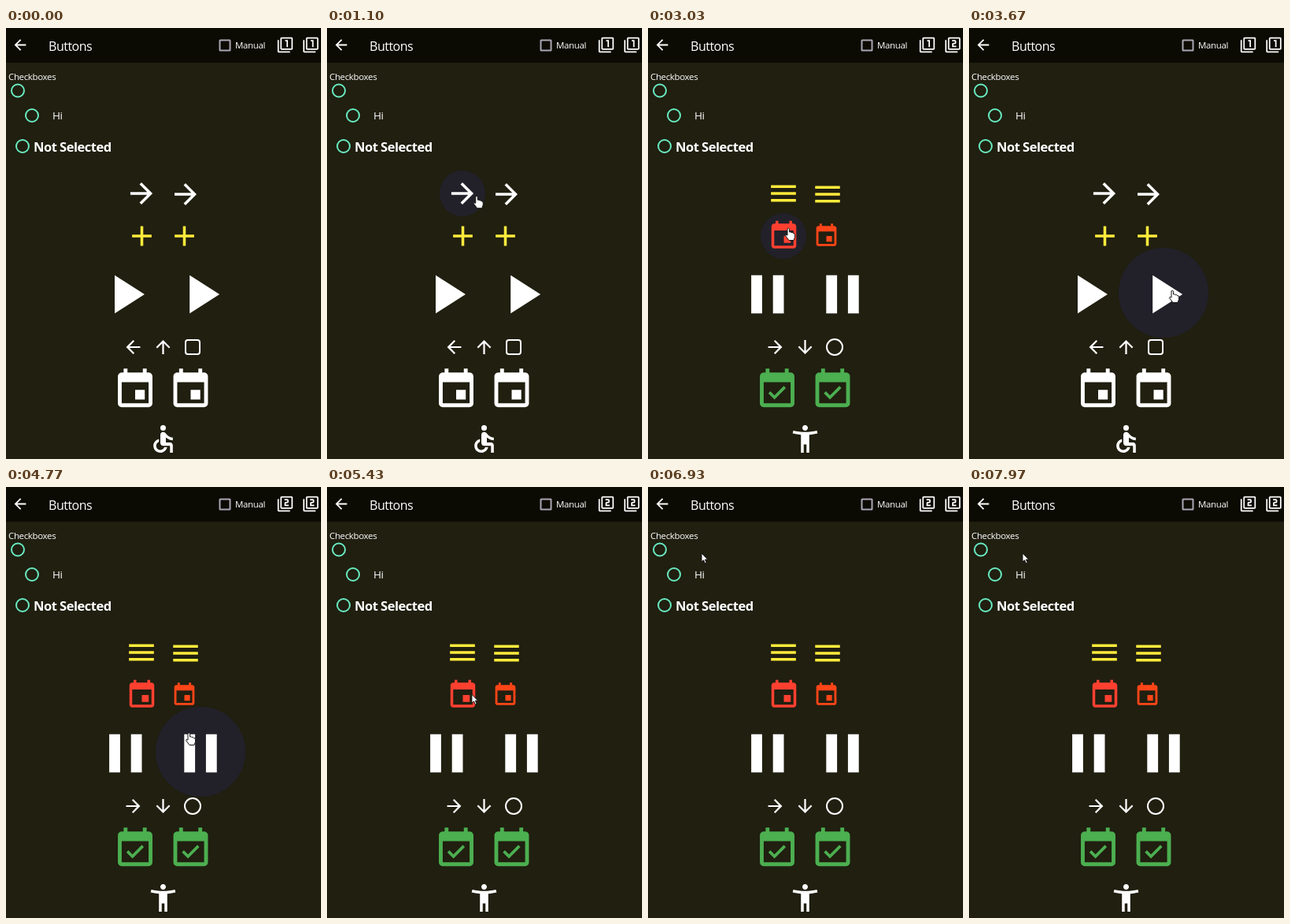
An HTML page with a canvas that plays this animation: 400x547 px, repeating every 8 s.

```html
<!DOCTYPE html>
<html lang="en">
<head>
<meta charset="utf-8">
<title>Buttons</title>
<style>
  html, body { margin: 0; width: 100%; height: 100%; overflow: hidden; background: #201f10; }
  canvas { display: block; width: 400px; height: 547px; }
</style>
</head>
<body>
<canvas id="stage" width="400" height="547"></canvas>
<script>
const ctx = document.getElementById('stage').getContext('2d');
const LOOP = 8000;
const WHITE = '#fff', YELLOW = '#ffeb3b', GREEN = '#4caf50', MINT = '#68e9c0';
const BODY = '#201f10', HEADER = '#0c0b03', HOVER = '#22212a';

// Icons on a 24 unit grid
const calendar = 'M19 3h-1V1h-2v2H8V1H6v2H5c-1.11 0-1.99.9-1.99 2L3 19c0 1.1.89 2 2 2h14c1.1 0 2-.9 2-2V5c0-1.1-.9-2-2-2zm0 16H5V8h14v11z';
const pages = 'M3 5H1v16c0 1.1.9 2 2 2h16v-2H3V5zM21 1H7c-1.1 0-2 .9-2 2v14c0 1.1.9 2 2 2h14c1.1 0 2-.9 2-2V3c0-1.1-.9-2-2-2zm0 16H7V3h14v14z';
const shapes = {
  arrow: 'M12 4l-1.41 1.41L16.17 11H4v2h12.17l-5.58 5.59L12 20l8-8z',
  menu: 'M3 18h18v-2H3v2zm0-5h18v-2H3v2zm0-7v2h18V6H3z',
  plus: 'M19 13h-6v6h-2v-6H5v-2h6V5h2v6h6v2z',
  play: 'M8 5v14l11-7z',
  pause: 'M6 19h4V5H6v14zm8-14v14h4V5h-4z',
  event: calendar + 'M17 12h-5v5h5v-5z',
  eventDone: calendar + 'M16.53 11.06L15.47 10l-4.88 4.88-2.12-2.12-1.06 1.06L10.59 17l5.94-5.94z',
  one: pages + 'M14 15h2V5h-4v2h2v8z',
  two: pages + 'M17 13h-4v-2h2c1.1 0 2-.89 2-2V7c0-1.11-.9-2-2-2h-4v2h4v2h-2c-1.1 0-2 .89-2 2v4h6v-2z',
  wheelchair: 'M14 4a2 2 0 1 1-4 0a2 2 0 1 1 4 0zM19 13v-2c-1.54.02-3.09-.75-4.07-1.83l-1.29-1.43c-.17-.19-.38-.34-.61-.45H13c-.35-.2-.75-.3-1.19-.26C10.76 7.11 10 8.04 10 9.09V15c0 1.1.9 2 2 2h5v5h2v-5.5c0-1.1-.9-2-2-2h-3v-3.45c1.29 1.07 3.25 1.94 5 1.95zm-6.17 5c-.41 1.16-1.52 2-2.83 2-1.66 0-3-1.34-3-3 0-1.31.84-2.41 2-2.83V12.1c-2.28.46-4 2.48-4 4.9 0 2.76 2.24 5 5 5 2.42 0 4.44-1.72 4.9-4h-2.07z',
  person: 'M20.5 6c-2.61.7-5.67 1-8.5 1s-5.89-.3-8.5-1L3 8c1.86.5 4 .83 6 1v13h2v-6h2v6h2V9c2-.17 4.14-.5 6-1l-.5-2zM12 6c1.1 0 2-.9 2-2s-.9-2-2-2-2 .9-2 2 .9 2 2 2z'
};
const paths = Object.fromEntries(Object.entries(shapes).map(([name, d]) => [name, new Path2D(d)]));
const hand = new Path2D('M0 1Q1.4-.8 2.6 1V5Q4.5 4.3 5 5.7Q7 5 7.4 6.6Q9.5 6.2 9.5 8.5V11.5L8 15.5H2L-2.6 9.5Q-2.8 7.8 0 9z');
const pointer = new Path2D('M0 0V11L2.6 8.8L4.4 13L6.3 12.2L4.5 8.1H7.8z');

const cursorKeys = [
  [0, 412, 300], [100, 412, 300], [950, 190, 214], [1500, 183, 210], [2350, 183, 210],
  [2800, 177, 254], [3250, 177, 254], [3580, 257, 333], [4250, 257, 333], [4650, 231, 312],
  [5200, 231, 312], [5850, 68, 143], [6770, 68, 143], [6900, 68, 84], [LOOP, 68, 84]
];
// start, end, centre x, centre y, radius
const roundHovers = [
  [950, 2500, 172, 210, 29], [2550, 3330, 172, 264, 29],
  [3400, 3500, 151, 336, 57], [3480, 5150, 247, 336, 57]
];
const rowHover = [5720, 6810];

const clamp = v => Math.max(0, Math.min(1, v));
const fade = (t, start, end) => Math.min(clamp((t - start) / 120), clamp((end + 120 - t) / 120));
const within = (t, [start, end]) => t >= start && t < end;

function icon(name, x, y, scale, color = WHITE, turn = 0) {
  ctx.save();
  ctx.translate(x, y);
  ctx.rotate(turn * Math.PI / 2);
  ctx.scale(scale, scale);
  ctx.translate(-12, -12);
  ctx.fillStyle = color;
  ctx.fill(paths[name], 'evenodd');
  ctx.restore();
}

function outline(x, y, radius, corner, color) {
  ctx.beginPath();
  ctx.roundRect(x - radius, y - radius, radius * 2, radius * 2, corner);
  ctx.strokeStyle = color;
  ctx.lineWidth = 2;
  ctx.stroke();
}

function text(value, x, y, size, weight = 500) {
  ctx.font = `${weight} ${size}px "Open Sans", "Noto Sans", sans-serif`;
  ctx.letterSpacing = `${-0.03 * size}px`;
  ctx.fillStyle = WHITE;
  ctx.fillText(value, x, y);
}

function drawHovers(t) {
  ctx.fillStyle = HOVER;
  for (const [start, end, x, y, r] of roundHovers) {
    ctx.globalAlpha = fade(t, start, end);
    ctx.beginPath();
    ctx.arc(x, y, r, 0, Math.PI * 2);
    ctx.fill();
  }
  ctx.globalAlpha = fade(t, ...rowHover);
  ctx.fillRect(1, 129, 396, 39);
  ctx.globalAlpha = 1;
}

function drawCursor(t) {
  const next = Math.max(1, cursorKeys.findIndex(key => key[0] > t));
  const [t0, x0, y0] = cursorKeys[next - 1], [t1, x1, y1] = cursorKeys[next];
  const u = (t - t0) / (t1 - t0), k = u * u * (3 - 2 * u);
  const overButton = [...roundHovers, rowHover].some(span => within(t, span));
  const shape = overButton ? hand : pointer;
  ctx.save();
  ctx.translate(x0 + (x1 - x0) * k, y0 + (y1 - y0) * k);
  ctx.fillStyle = WHITE;
  ctx.strokeStyle = '#111';
  ctx.lineWidth = 1;
  ctx.fill(shape);
  ctx.stroke(shape);
  ctx.restore();
}

function draw(t) {
  const toggled = within(t, [1300, 3060]) || t >= 4600;
  const firstPageToggled = toggled && !within(t, [3020, 3060]);
  ctx.fillStyle = BODY;
  ctx.fillRect(0, 0, 400, 547);
  ctx.fillStyle = HEADER;
  ctx.fillRect(0, 0, 400, 44);
  drawHovers(t);

  icon('arrow', 18, 21.5, 0.92, WHITE, 2);
  text('Buttons', 54, 28.5, 16);
  outline(278, 22, 6.5, 0.5, '#aaa6b4');
  text('Manual', 291, 26, 11.5);
  icon(firstPageToggled ? 'two' : 'one', 354.5, 21.5, 0.88);
  icon(toggled ? 'two' : 'one', 387, 21.5, 0.88);

  text('Checkboxes', 3, 66, 11.5);
  outline(15, 79.5, 8, 8, MINT);
  outline(33, 111, 8, 8, MINT);
  text('Hi', 59, 116, 13.5);
  outline(21, 150, 8, 8, MINT);
  text('Not Selected', 35, 157, 16.5, 700);

  const [first, firstColor] = toggled ? ['menu', YELLOW] : ['arrow', WHITE];
  icon(first, 172, 210, 1.76, firstColor);
  icon(first, 228, 211, 1.75, firstColor);
  if (toggled) {
    icon('event', 172.5, 264, 1.75, '#ff4030');
    icon('event', 226.5, 264, 1.43, '#ff4518');
  } else {
    icon('plus', 172.5, 264, 1.77, YELLOW);
    icon('plus', 226.5, 264, 1.77, YELLOW);
  }
  for (const x of [151.8, 247]) icon(toggled ? 'pause' : 'play', x, 338, 3.45);

  icon('arrow', 161.5, 405, 1.12, WHITE, toggled ? 0 : 2);
  icon('arrow', 199.5, 405, 1.12, WHITE, toggled ? 1 : 3);
  if (toggled) outline(237, 405, 10, 10, WHITE);
  else outline(237, 405, 9, 3, WHITE);

  for (const x of [164, 234.5]) {
    icon(toggled ? 'eventDone' : 'event', x, 459.2, 2.44, toggled ? GREEN : WHITE);
  }
  icon(toggled ? 'person' : 'wheelchair', 199.5, 521.5, 1.76);
  drawCursor(t);
}

const began = performance.now();
function tick() {
  draw((performance.now() - began) % LOOP);
  requestAnimationFrame(tick);
}
tick();
</script>
</body>
</html>
```
